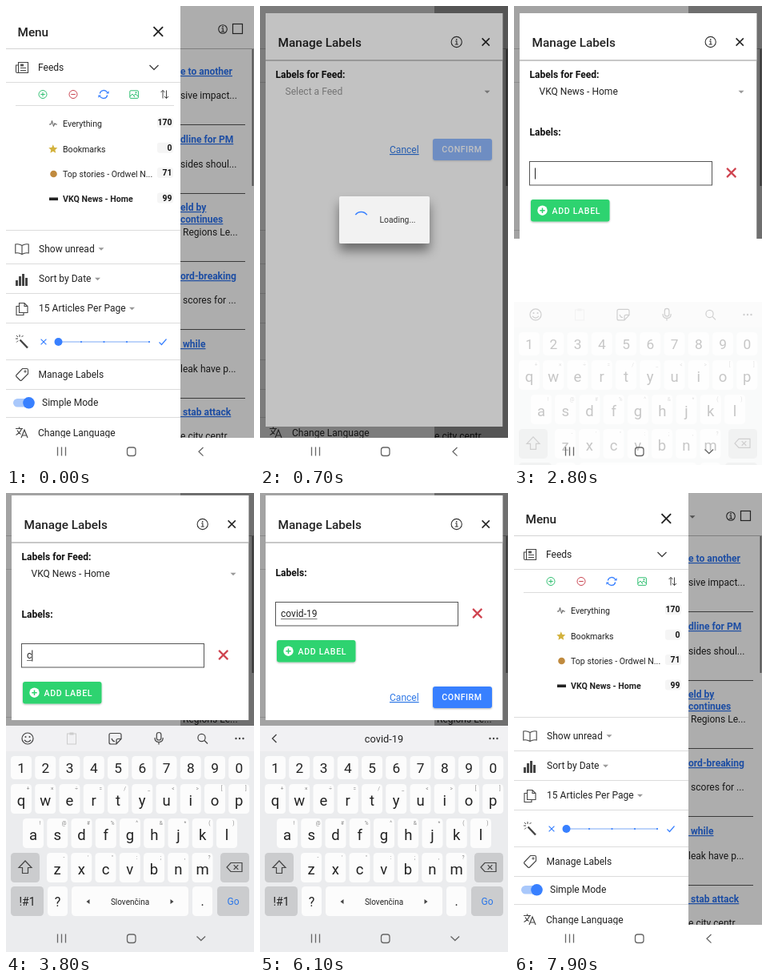
Recreate the animation shown at these times as an HTML page. Size 310x574 px, loop 8 s.

```html
<!DOCTYPE html>
<html lang="en">
<head>
<meta charset="utf-8">
<title>Manage labels</title>
<style>
html, body { margin: 0; width: 100%; height: 100%; overflow: hidden; background: #fff; }
svg { display: block; width: 310px; height: 574px; font-family: Roboto, "Open Sans", sans-serif; }
text { white-space: pre; }
</style>
</head>
<body>
<svg id="stage" viewBox="0 0 310 574" xmlns="http://www.w3.org/2000/svg"></svg>
<script>
const LOOP = 8000;
const FULL = 540, SHORT = 291;
const BLUE = '#3880ff', INK = '#222';
const FEED = 'VKQ News - Home';

// markup helpers
const text = (x, y, s, o = {}) =>
  `<text x="${x}" y="${y}" font-size="${o.size || 12.06}" font-weight="${o.weight || 400}" fill="${o.fill || INK}"` +
  ` text-anchor="${o.anchor || 'start'}" ${o.more || ''}>${s}</text>`;
const rect = (x, y, w, h, fill, more = '') =>
  `<rect x="${x}" y="${y}" width="${w}" height="${h}" fill="${fill}" ${more}/>`;
const path = (d, color = '#444', w = 1, more = '') =>
  `<path d="${d}" fill="none" stroke="${color}" stroke-width="${w}" ${more}/>`;
const solid = (d, fill) => `<path d="${d}" fill="${fill}"/>`;
const ring = (x, y, r, color, w = 1) =>
  `<circle cx="${x}" cy="${y}" r="${r}" fill="none" stroke="${color}" stroke-width="${w}"/>`;
const dot = (x, y, r, fill) => `<circle cx="${x}" cy="${y}" r="${r}" fill="${fill}"/>`;
const rule = (x1, x2, y, color = '#dcdcdc', w = 1) => path(`M${x1} ${y}H${x2}`, color, w);
const cross = (x, y, r, color, w) => path(`M${x - r} ${y - r}l${2 * r} ${2 * r}M${x + r} ${y - r}l${-2 * r} ${2 * r}`, color, w);
const caret = (x, y, color = '#999') => solid(`M${x - 3.5} ${y - 1.8}h7l-3.5 3.6z`, color);
const info = (x, y, r) => ring(x, y, r, '#333', 1.1) + path(`M${x - 1.5} ${y - 1}h1.7v4M${x - 2} ${y + 3}h4`, '#333', 1.1) + dot(x, y - 3.2, .9, '#333');

function pageMarkup() {
  const articles = [
    [86, ['e to another'], 'sive impact...', 116],
    [171, ['dline for PM'], 'sides shoul...', 202],
    [256, ['eld by', 'continues'], ' Regions Le...', 287],
    [342, ['ord-breaking'], ' scores for ...', 372],
    [427, [' while'], 'leak have p...', 458],
    [512, [' stab attack'], 'e city centr...', 542],
  ];
  let s = rect(0, 0, 310, FULL, '#fff') + rule(218, 310, 53.5, '#bbb') +
    info(271, 29, 5.3) + rect(283.5, 22.5, 12, 12, 'none', 'stroke="#333" stroke-width="1.2"') +
    `<g id="pageCaret">${caret(223, 30, '#777')}</g>`;
  for (const [y, links, body, bodyY] of articles) {
    links.forEach((l, i) => s += text(218, y + i * 15, l, { weight: 700, fill: '#2a72f0', more: 'text-decoration="underline"' }));
    s += text(218, bodyY, body) + rule(218, 299, bodyY + 32.5, '#555');
  }
  return s + rect(307.5, 54, 2, 171, '#777') + rect(218, 0, 92, FULL, '#000', 'opacity=".32"');
}

function menuMarkup() {
  let s = rect(0, 0, 218, FULL, '#fff') +
    text(14.5, 37.5, 'Menu', { size: 15.3, weight: 500 }) + cross(190.3, 32, 5.8, '#222', 1.9) + rule(0, 218, 53.5, '#d4d4d4');
  // feeds header
  s += path('M15.5 70.5h12v13h-13.5q-1.5 0-1.5-1.5v-8h3zM15.5 74v9M18 77.5h7M18 80.5h7', '#444', 1.1) + rect(18, 72.5, 4, 3, '#555') +
    text(40, 81.3, 'Feeds') + path('M179.5 74l5.5 5.5 5.5-5.5', '#444', 1.4) + rule(0, 218, 95.5);
  // feed tools
  const green = '#2fbf71', red = '#c9434f';
  s += ring(46, 110.5, 5, green) + path('M43.3 110.5h5.4M46 107.8v5.4', green) +
    ring(84, 110.5, 5, red) + path('M81.3 110.5h5.4', red) +
    path('M117.3 109.5a5 5 0 0 1 9.2-1.5M126.7 111.5a5 5 0 0 1-9.2 1.5', BLUE, 1.3) +
    solid('M125 109.6h3.6v-3.4zM119 111.4h-3.6v3.4z', BLUE) +
    rect(154.8, 105.8, 10.6, 9.6, 'none', `stroke="${green}" rx="1.2"`) + path('M155 113l3-3 3 4M159.5 112l2.5-2 3.2 3', green) + dot(162.5, 108.3, 1, green) +
    path('M196 115.5v-10M193.6 108l2.4-2.6 2.4 2.6M200.5 105.5v10M198.1 113l2.4 2.6 2.4-2.6', '#444') + rule(12, 210, 124.5);
  // feed list
  const feeds = [['Everything', 170], ['Bookmarks', 0], ['Top stories - Ordwel N...', 71], [FEED, 99]];
  feeds.forEach(([name, n], i) => {
    const y = 147.3 + i * 31.4;
    s += text(71, y + 3.8, name, { size: 10.6, weight: i === 3 ? 700 : 400 }) +
      rect(189, y - 8, 20, 13, '#f5f5f5', 'rx="3"') +
      text(207.5, y + 2, n, { size: 10.4, weight: 700, anchor: 'end', fill: '#111' });
  });
  s += path('M54 148h2.2l1.3-4.5 2 7 1.5-4 .8 1.5h2', '#555') +
    solid('M58.8 173.3l1.6 3.6 3.9.4-2.9 2.6.8 3.9-3.4-2-3.4 2 .8-3.9-2.9-2.6 3.9-.4z', '#d3b23d') +
    dot(59.5, 210, 4.3, '#c08a3e') + rect(54, 239.5, 11, 3.6, '#222') + rule(0, 218, 280.5);
  // settings
  s += path('M20 299.5q-4-2.5-8.2-1.5v11q4.200-1 8.200 1.500q4-2.500 8.200-1.500v-11q-4.200-1-8.200 1.500zv11', '#444', 1.1) +
    text(41, 308, 'Show unread') + caret(119, 304) + rule(0, 218, 322.5) +
    [[12, 7], [16, 12], [20, 15], [24, 10]].map(([x, h]) => rect(x, 350 - h, 3, h, '#444')).join('') +
    text(41, 345.3, 'Sort by Date') + caret(114.5, 341.5) + rule(0, 218, 359.5) +
    path('M16.500 371.500h6.500l4 4v8h-10.500zM23 371.500v4h4M16.500 375.500h-3.500v11h9v-3', '#444', 1.1) +
    text(41, 382.3, '15 Articles Per Page') + caret(157.5, 378.5) + rule(0, 218, 396.5) +
    path('M17.500 417.500l9.500 10', '#444', 2.4) + path('M17 411v3M12 416h3M13 412l2 2M21.500 412l-2 2M13.200 420.500l2-2', '#444', 1) +
    cross(47, 420, 3.4, BLUE, 1.2) + rule(65, 180, 420, '#7aa8f5') +
    [94, 122.5, 151, 179].map(x => dot(x, 420, 1.1, BLUE)).join('') + dot(65.5, 420, 5, BLUE) +
    path('M191.500 420.500l3 3 6-7', BLUE, 1.2) + rule(0, 218, 442.5) +
    path('M13 461.500l7.500-8h5.500q1.500 0 1.500 1.500v5l-8 8q-1 1-2 0l-4.500-4.500q-1-1 0-2z', '#444', 1.1) + ring(24, 457, 1.1, '#444') +
    text(40.500, 465, 'Manage Labels') + rule(0, 218, 479.5) +
    rect(9, 491, 26, 10.500, '#a9c8fb', 'rx="5.250"') + dot(28.500, 496.300, 7.300, BLUE) +
    text(45, 500.300, 'Simple Mode') + rule(0, 218, 514.5) +
    path('M12 528.500h9M16.500 526.500v2M19.500 528.500q-2 5.500-7 8M14 530.500q2 4 4.500 5M19 540l4-10 4 10M20.500 537h5', '#444', 1.2) +
    text(40, 537.5, 'Change Language');
  return s;
}

function modalMarkup() {
  return rect(7, 0, 296.5, 517, '#fff') +
    `<g clip-path="url(#underHeader)"><g id="scroll">` +
      text(19.5, 81, 'Labels for Feed:', { weight: 700, fill: '#111' }) +
      text(31.5, 102.3, '', { more: 'id="feed"' }) + caret(284, 98.5) +
      `<g id="labels">${text(19.5, 153, 'Labels:', { weight: 700, fill: '#111' })}
        <g id="entry">${rect(19.5, 185.5, 228, 29.5, '#fff', 'stroke="#555"')}
          ${text(26, 204, '', { more: 'id="typed"' })}${path('', '#555', .8, 'id="compose"')}
          ${path('M0 193.500v14', '#222', 1, 'id="cursor"')}${cross(271.7, 199.5, 5.6, '#cf4450', 2.2)}</g>
        <g id="add">${rect(21, 233, 98.5, 27.5, '#2dd36f', 'rx="3" filter="url(#soft)"')}
          ${dot(35.5, 246.7, 6.2, '#fff')}${path('M32.300 246.700h6.400M35.500 243.500v6.400', '#2dd36f', 1.5)}
          ${text(47.5, 250.5, 'ADD LABEL', { size: 10.6, weight: 500, fill: '#fff', more: 'letter-spacing=".65"' })}</g></g>
      <g id="actions">${text(162, 309, 'Cancel', { fill: '#2f78e6', more: 'text-decoration="underline"' })}
        <g id="confirm">${rect(216, 291, 74, 27, BLUE, 'rx="3" filter="url(#soft)"')}
        ${text(227.3, 308.3, 'CONFIRM', { size: 10.6, weight: 500, fill: '#fff', more: 'letter-spacing=".55"' })}</g></g>
    </g></g>` +
    rect(7, 0, 296.5, 58, '#fff') + rule(7, 303.5, 59, '#c8c8c8', 2) +
    text(22.5, 41.5, 'Manage Labels', { size: 15.3, weight: 500 }) + info(245.7, 36, 6.6) + cross(282.2, 36, 4.6, '#222', 1.5);
}

function keyboardMarkup() {
  const STEP = 30.25, DARK = '#cbccce';
  const key = (x, y, w, h, fill = '#fcfcfc') => rect(x, y, w, h, fill, 'rx="4.500"');
  const row = (chars, x0, y, h, hints = '') => [...chars].map((c, i) => {
    const x = x0 + i * STEP;
    return key(x - 13, y, 26, h) + text(x, y + h / 2 + 6.2 + (hints ? 2.5 : 0), c, { size: hints ? 18.5 : 17.3, anchor: 'middle' }) +
      (hints ? text(x + 8.5, y + 8, hints[i].replace('<', '&lt;').replace('&', '&amp;').replace('&amp;lt;', '&lt;'), { size: 6.5, anchor: 'middle', fill: '#888' }) : '');
  }).join('');
  const face = ring(27, 307, 7, '#444', 1.2) + dot(24.5, 305, 1, '#444') + dot(29.5, 305, 1, '#444') + path('M23 309q4 4.500 8 0', '#444', 1.2);
  const tools = face + rect(76.500, 301, 11, 13, 'none', 'stroke="#ccc"') + rect(79.5, 299.5, 5, 3, '#ccc') +
    path('M131 300.500h11q2 0 2 2v5l-6 6.500h-7q-2 0-2-2v-9.500q0-2 2-2zM144 307.500h-4q-2 0-2 2v4.500M132 307q1.500 4 4 3.500', '#444', 1.2) +
    rect(188.3, 299.5, 5.6, 9.5, 'none', 'stroke="#444" stroke-width="1.200" rx="2.800"') + path('M186 306q0 5.500 5.100 5.500t5.100-5.500M191 311.500v3', '#444', 1.2) +
    ring(244.5, 306, 4.6, '#444', 1.2) + path('M248 309.500l4 4', '#444', 1.2);
  return rect(0, 291, 310, 300, '#ebecee') + rect(0, 291, 310, 32, '#f1f1f3') +
    `<g id="tools">${tools}</g>
     <g id="suggest">${path('M20.500 302l-5 5 5 5', '#444', 1.4)}${text(155, 311.5, '', { size: 12.8, anchor: 'middle', more: 'id="word"' })}</g>` +
    [287.5, 292, 296.5].map(x => dot(x, 307, 1.2, '#444')).join('') +
    row('1234567890', 19, 329, 29) + row('qwertyuiop', 19, 364, 37, '+×÷=/_<>[]') +
    row('asdfghjkl', 34, 407, 37, '!@#%^&*()') + row('zxcvbnm', 64, 450, 37, `-'":;,?`) +
    key(6, 450, 36, 37, DARK) + path('M24 460l-8 8.500h4.500v7h7v-7h4.500z', '#444', 1.2) +
    key(268, 450, 36, 37, DARK) + path('M281 462.500h14v11h-14l-5-5.500z', '#444', 1.2) + cross(287.5, 468, 2.8, '#444', 1.2) +
    key(6, 492, 41, 37, DARK) + text(26.5, 516, '!#1', { size: 14, anchor: 'middle' }) +
    key(52, 492, 25, 37) + text(64.5, 516.5, '?', { size: 16, anchor: 'middle' }) +
    key(82, 492, 146, 37) + text(155, 514.5, 'Slovenčina', { size: 10, anchor: 'middle' }) +
    solid('M104.500 508v6l-4-3zM205.500 508v6l4-3z', '#444') +
    key(233, 492, 25, 37) + text(245.5, 516, '.', { size: 16, anchor: 'middle' }) +
    key(264, 492, 40, 37, DARK) + text(284, 515.3, 'Go', { size: 12, anchor: 'middle', fill: '#2a76e8' });
}

const clip = (id, y, h, x = 0, w = 310) => `<clipPath id="${id}"><rect id="${id}Box" x="${x}" y="${y}" width="${w}" height="${h}"/></clipPath>`;
const cover = id => rect(0, 0, 310, FULL, '#000', `id="${id}"`);

document.getElementById('stage').innerHTML = `
  <defs>${clip('view', 0, FULL)}${clip('sheet', 0, 517, 7, 296.5)}${clip('underHeader', 60, 500)}
    <filter id="soft" x="-10%" y="-20%" width="120%" height="150%"><feDropShadow dx="0" dy="1" stdDeviation="1" flood-opacity=".3"/></filter>
    <filter id="deep" x="-30%" y="-30%" width="160%" height="190%"><feDropShadow dx="0" dy="9" stdDeviation="7" flood-opacity=".45"/></filter>
  </defs>
  ${rect(0, 0, 310, 574, '#fff')}
  <g clip-path="url(#view)">${pageMarkup()}${menuMarkup()}${cover('modalCover')}
    <g id="modal"><g clip-path="url(#sheet)">${modalMarkup()}</g></g>
    ${cover('busyCover')}
    <g id="busy">${rect(0, 0, 113, 59, '#f2f2f2', 'rx="2" filter="url(#deep)"')}
      <path id="spin" d="M-7.200-4.800a8.700 8.700 0 0 1 14.400 0" fill="none" stroke="${BLUE}" stroke-width="1.500"/>
      ${text(50.5, 33, '', { size: 10.33, fill: '#333', more: 'id="busyText"' })}</g>
  </g>
  <g id="keyboard">${keyboardMarkup()}</g>
  ${path('M64.500 551.500v11M69.500 551.500v11M74.500 551.500v11', '#666', 1.3)}
  ${rect(151.5, 552, 10.5, 10.5, 'none', 'stroke="#666" stroke-width="1.300" rx="3"')}
  ${path('M246.500 552l-5.500 5.300 5.500 5.300', '#666', 1.3, 'id="back"')}
  ${path('M238.500 554.500l5.300 5 5.300-5', '#666', 1.3, 'id="hide"')}`;

const el = {};
document.querySelectorAll('[id]').forEach(n => el[n.id] = n);
const set = (id, name, value) => el[id].setAttribute(name, value);
const show = (id, on) => set(id, 'display', on ? 'inline' : 'none');
const say = (id, s) => { if (el[id].textContent !== s) el[id].textContent = s; };
const move = (id, x, y) => set(id, 'transform', `translate(${x} ${y})`);

const ramp = (t, a, b) => Math.min(1, Math.max(0, (t - a) / (b - a)));
const out = p => 1 - (1 - p) ** 3;
const smooth = p => p * p * (3 - 2 * p);
const pulse = (t, a, b, c, d) => ramp(t, a, b) * (1 - ramp(t, c, d));

const WORD = 'covid-19';
const KEY_TIMES = [3700, 3900, 4100, 4300, 4500, 4800, 5050, 5350];

function render(t) {
  const shrunk = t >= 2700 && t < 6950;
  const compact = t >= 2950 && t < 6950;
  set('viewBox', 'height', shrunk ? SHORT : FULL);
  show('pageCaret', t >= 6950);

  // modal
  const enter = ramp(t, 380, 640), leave = ramp(t, 6700, 6950);
  const shown = out(enter) * (1 - leave);
  show('modal', shown > 0);
  set('modal', 'opacity', shown);
  set('modalCover', 'opacity', .36 * shown);
  move('modal', 0, (compact ? 3 : 9) + 40 * (1 - out(enter)) + 30 * leave);
  set('sheetBox', 'height', compact && leave === 0 ? 281 : 517);

  // form
  const picked = t >= 1900, entry = t >= 2500;
  say('feed', picked ? FEED : 'Select a Feed');
  set('feed', 'fill', picked ? INK : '#999');
  show('labels', picked);
  show('entry', entry);
  move('add', 0, entry ? 0 : -47);
  move('actions', 0, entry ? 0 : picked ? -47 : -134);
  set('confirm', 'opacity', picked ? 1 : .55);
  move('scroll', 0, -52 * smooth(ramp(t, 5700, 6050)));

  // typing
  const typed = WORD.slice(0, KEY_TIMES.filter(k => t >= k).length);
  say('typed', typed);
  say('word', typed);
  const width = typed ? el.typed.getComputedTextLength() : 0;
  const composing = typed && t < 6400;
  set('compose', 'd', composing ? `M26 206.500h${width}` : '');
  move('cursor', 26.5 + width, 0);
  const lastKey = Math.max(2600, ...KEY_TIMES.filter(k => t >= k));
  show('cursor', (t - lastKey) % 1000 < 500 && t < 6400);
  show('tools', typed.length < 2);
  show('suggest', typed.length > 1);

  // keyboard
  const rise = ramp(t, 2700, 3000), fall = ramp(t, 6700, 7000);
  show('keyboard', rise > 0 && fall < 1);
  move('keyboard', 0, 119 * (1 - rise) + 79 * fall);
  set('keyboard', 'opacity', rise < 1 ? rise * .75 : 1 - Math.min(1, fall * 1.4));
  const down = t >= 2750 && t < 6750;
  show('back', !down);
  show('hide', down);

  // busy box
  const saving = t > 4000;
  const busy = saving ? pulse(t, 6350, 6500, 6800, 6950) : pulse(t, 550, 700, 1200, 1350);
  show('busy', busy > 0);
  set('busy', 'opacity', busy);
  set('busyCover', 'opacity', (saving ? .32 : .24) * busy);
  move('busy', saving ? 93.5 : 99, saving ? 114 : 238);
  set('spin', 'transform', `translate(27.500 ${saving ? 30 : 28}) rotate(${(t - 700) / 813.33 * 360})`);
  say('busyText', saving ? 'Saving data' : 'Loading...');
}

const start = performance.now();
function frame() {
  render((performance.now() - start) % LOOP);
  requestAnimationFrame(frame);
}
render(0);
requestAnimationFrame(frame);
</script>
</body>
</html>
```
